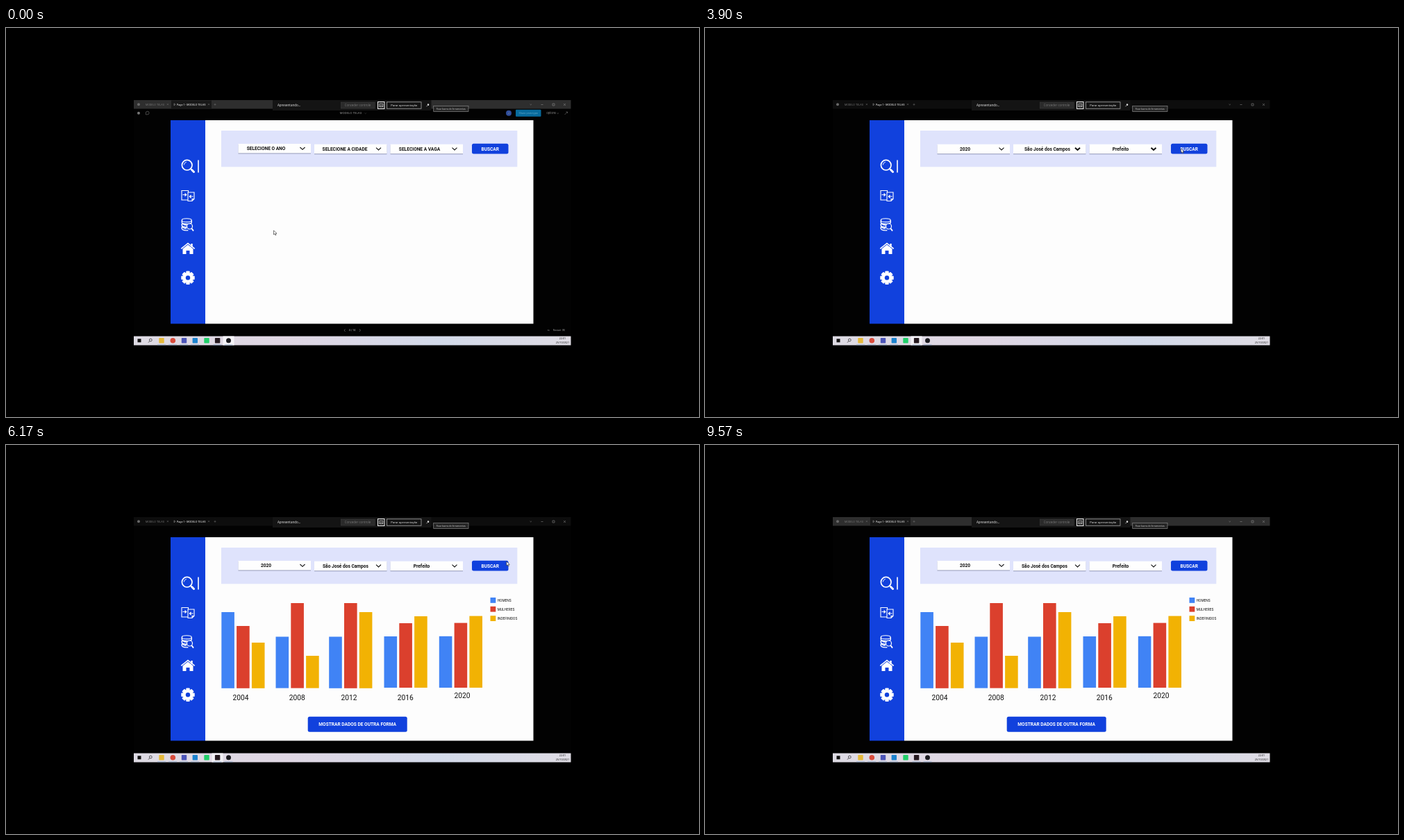
Recreate the animation shown at these times as an HTML page. Size 998x561 px, loop 9.61 s.

```html
<!DOCTYPE html>
<html lang="pt">
<head>
<meta charset="utf-8">
<style>
html, body { margin: 0; width: 100%; height: 100%; overflow: hidden; background: #000; }
svg { display: block; width: 998px; height: 561px; }
</style>
</head>
<body>
<svg id="stage" viewBox="0 0 998 561"></svg>
<script>
const LOOP = 9610;
const FOCUS_IN = 520, FOCUS_OUT = 8900;
const BLUE = '#1141dd', SERIES = ['#4083f5', '#db402d', '#f2b203'];
const UI = "'Open Sans', sans-serif", APP = 'Roboto, sans-serif', TABS = 'Inter, sans-serif';
const PROJECT = 'MODELO TELAS';

const rect = (x, y, w, h, fill, extra = '') =>
  `<rect x="${x}" y="${y}" width="${w}" height="${h}" fill="${fill}" ${extra}/>`;
const circle = (x, y, r, fill, extra = '') => `<circle cx="${x}" cy="${y}" r="${r}" fill="${fill}" ${extra}/>`;
const line = (d, color, width = 1, extra = '') =>
  `<path d="${d}" fill="none" stroke="${color}" stroke-width="${width}" ${extra}/>`;
const group = (id, body) => `<g id="${id}">${body}</g>`;

// y is the middle of the capital letters
const text = (x, y, size, str, { color = '#111', font = APP, weight = 400, anchor = 'middle' } = {}) =>
  `<text x="${x}" y="${y + size * .355}" font-size="${size}" fill="${color}" font-family="${font}"
    font-weight="${weight}" text-anchor="${anchor}">${str}</text>`;
const label = (x, y, str, color = '#111') => text(x, y, 6.6, str, { color, weight: 700 });

function button(x, y, w, h, str) {
  return rect(x, y, w, h, BLUE, 'rx="2.5"') + label(x + w / 2, y + h / 2, str, '#fff');
}

function select(x, y, str, { shift = 0, bold = false, chevronY = 0 } = {}) {
  return rect(x, y + .8, 104.5, 13.8, '#8d93ac', 'opacity=".65"') +
    rect(x, y, 104.5, 13.3, '#fefefe') +
    label(x + 45 + shift, y + 6.6, str) +
    line(`M${x + 89} ${y + 5 + chevronY}l3.5 3.3 3.5-3.3`, '#111', bold ? 2 : 1.1);
}

function windowFrame() {
  const dim = { color: '#777', font: TABS, anchor: 'start' };
  return rect(184, 104, 629.5, 353.5, '#020202') +
    group('titleBar', rect(184, 104, 629.5, 12.5, '#2e2e2e') + rect(238, 104.5, 58, 12, '#191919')) +
    group('titleBarDark', rect(184, 104, 629.5, 12.5, '#0d0d0d')) +
    circle(191, 110.3, 2, '#686868') +
    text(201, 110.3, 3.5, PROJECT, dim) +
    text(246, 110.3, 3.5, 'Page 1 - ' + PROJECT, { ...dim, color: '#ddd', weight: 500 }) +
    line('M242 108.8l2 1.5-2 1.5z', '#aaa', .5) +
    line('M231.9 109.2l2 2m0-2l-2 2M291 109.2l2 2m0-2l-2 2M299.5 110.3h3m-1.5-1.5v3', '#777', .5) +
    line('M754.5 109.8l1.2 1.1 1.2-1.1M770.5 110.5h3M787 109h3v3h-3zM803 109l3 3m0-3l-3 3', '#999', .5);
}

function meetingBar() {
  const ui = { font: UI, color: '#eee' };
  return rect(384, 104, 228.5, 15, '#141414') +
    text(391, 111.5, 4.5, 'Apresentando...', { ...ui, anchor: 'start' }) +
    rect(482.5, 107, 48.5, 9, '#2b2b2b', 'stroke="#424242" stroke-width=".5"') +
    text(506.5, 111.5, 4.4, 'Conceder controle', { ...ui, color: '#777' }) +
    rect(535.5, 106.5, 9.5, 10, '#222', 'stroke="#eee"') +
    line('M537.8 109.2h5v4.5h-5zM538.5 113l1.7-2 2.2 2', '#ddd', .7) +
    rect(548.5, 106.8, 49.5, 9.4, '#141414', 'stroke="#bbb" stroke-width=".7"') +
    text(573.3, 111.5, 4.2, 'Parar apresentação', ui) +
    line('M605.5 113.2l1.5-1.5M607 110l2 2', '#ddd', .8) + circle(608, 110.5, 1.2, '#ddd') +
    rect(615.7, 112.5, 50.3, 8, '#262626', 'stroke="#888" stroke-width=".7"') +
    text(640.8, 116.6, 3.4, 'Fixar barra de ferramentas', { ...ui, color: '#ccc' });
}

function viewerControls() {
  const dim = { color: '#999', font: TABS };
  return circle(191, 122.7, 2, '#777') +
    line('M201.3 124.8v-2a2.4 2.3 0 1 1 2.4 2z', '#777', .6) +
    text(496.5, 123, 4.1, PROJECT, dim) +
    line('M516.5 122.5l1.2 1.1 1.2-1.1', '#555', .5) +
    circle(724, 122.8, 4, '#304f9c') + text(724, 122.8, 3.5, 'J', dim) +
    rect(734, 117.8, 36.5, 10, '#086b9d', 'rx="1"') +
    text(752.3, 122.8, 3.6, 'Share prototype', { ...dim, color: '#62a6c5' }) +
    text(785, 122.8, 3.7, 'Options', dim) +
    line('M793.5 122.5l1.2 1.1 1.2-1.1M804.5 125l4-4m-2 0h2v2', '#888', .5) +
    text(498.5, 436, 3.8, '4 / 14', { ...dim, color: '#bbb' }) +
    line('M488.5 434.2l-1.5 1.8 1.5 1.8M509 434.2l1.5 1.8-1.5 1.8M783 436h-3l1-1', '#888', .6) +
    text(796.5, 436, 3.5, 'Restart (R)', dim);
}

function taskbar() {
  const tile = (x, fill) => rect(x - 3.7, 447, 7.4, 7.4, fill, 'rx=".7"');
  const clock = { font: UI };
  return rect(184, 444.5, 629.5, 13, 'url(#barTint)') +
    group('recorderActive', rect(312.5, 444.5, 16, 13, '#f6f4f8')) +
    group('viewerActive', rect(296.5, 444.5, 16, 13, '#f3f1f6')) +
    rect(189.5, 448.3, 5, 5, '#111') +
    circle(208.3, 450, 1.9, 'none', 'stroke="#222" stroke-width=".7"') + line('M207 451.6l-2 2', '#222', .8) +
    tile(224, '#e5b93a') + circle(240.3, 450.8, 3.8, '#d94c3c') + tile(256.5, '#4c55b8') +
    tile(272.3, '#1c83cf') + tile(289, '#20cf69') + tile(304.6, '#25191f') + circle(320.5, 450.8, 3.5, '#1b1b20') +
    line('M218 457h12M234 457h12M250 457h12M266 457h12M298.500 457h12M314.500 457h12', '#6c8eb5', .7) +
    text(801.5, 448, 3.7, '22:01', clock) + text(801.5, 453.8, 3.7, '25/10/2021', clock);
}

function sidebar() {
  const white = '#fff';
  const teeth = Array.from({ length: 8 }, (_, i) =>
    rect(259.3, 350.6, 5.4, 6, white, `rx="1" transform="rotate(${i * 45} 262 360.300)"`)).join('');
  return rect(237, 133, 50, 293.5, BLUE) +
    circle(260.7, 197.7, 7.3, 'none', 'stroke="#fff" stroke-width="1.7"') +
    line('M256.300 197.500a4.500 4.500 0 0 1 3.500-4.200', white, .9) +
    line('M266 203l1.500 1.500', white, 1.5) +
    line('M267.500 204.500l3 3', white, 3, 'stroke-linecap="round"') +
    line('M277 190.500v18', white, 1.6) +
    line('M262 248h-9v-13.500h9.500v3M262 237h9v9.500l-3 3h-6zM268 249.500v-3h3', white, 1.1) +
    line('M254.500 240.500h5m-2-2l2.200 2-2.200 2M269.500 243h-5m2-2l-2.200 2 2.200 2', white, 1.2) +
    `<ellipse cx="260.300" cy="277.300" rx="7" ry="2.600" fill="none" stroke="#fff" stroke-width="1.1"/>` +
    line('M253.300 277.500v3c1 3 13 3 14 0v-3M253.300 282v3c1 2 4 2.300 7 2.200M253.300 286.500v3c1 2 5 2.700 9 2.200', white, 1.4) +
    line('M254 282.200q3 2 6 2M254 287q3 2 6 2', white, 1.5) +
    circle(264.500, 286, 4, BLUE, 'stroke="#fff" stroke-width="1.2"') +
    line('M267.300 289l2.700 3.600', white, 1.8) +
    `<path d="M254.500 318.500l7.500-6 7.500 6v7.500h-5v-5h-5v5h-5z" fill="#fff"/>` +
    rect(266.300, 311, 2.400, 5, white) +
    line('M252.300 318.300l9.700-7.800 9.700 7.800', white, 1.6) +
    teeth + circle(262, 360.300, 7.200, white) + circle(262, 360.300, 3.200, BLUE);
}

function cityMenu() {
  const cities = ['São José dos Campos', 'Jacareí', 'Caçapava', 'Cruzeiro'];
  return rect(444, 181, 104.5, 64, '#fdfdfd', 'stroke="#d8d9e2" stroke-width=".6"') +
    rect(444, 181, 104.5, 16, BLUE) +
    line('M444 212.600h104.500M444 228.700h104.500', '#555', .8) +
    cities.map((city, i) => label(i == 3 ? 498 : 496.3, 189 + i * 15.9, city, i ? '#111' : '#fff')).join('');
}

function chart() {
  // first bar x, label centre, baseline, tops of the three bars
  const years = [
    [310.3, 338, 350.8, 241, 261, 285],
    [388.5, 419.3, 350.6, 276.5, 228, 304],
    [465.2, 494, 350.8, 276.5, 228, 241],
    [544.5, 575.3, 350, 276, 257, 247],
    [623.8, 657, 350, 275.8, 256.6, 246.6]
  ];
  const bars = years.map(([x, mid, base, ...tops], i) =>
    tops.map((top, k) => rect(x + k * 21.8, top, 18.6, base - top, SERIES[k])).join('') +
    text(mid, i == 4 ? 361.600 : 364, 10.2, 2004 + i * 4)).join('');
  const legend = ['HOMENS', 'MULHERES', 'INDEFINIDOS'].map((name, i) => {
    const y = [224, 236.8, 250.2][i];
    return rect(697.5, y - 4, 7.800, 7.800, SERIES[i]) + text(707.7, y, 4.800, name, { anchor: 'start' });
  }).join('');
  return bars + legend + button(434.7, 391.8, 143, 22, 'MOSTRAR DADOS DE OUTRA FORMA');
}

const SJC = 'São José dos Campos';
const yearField = (str, x = 334.5, y = 167) => select(x, y, str, { shift: -5 });
const cityField = (str = 'SELECIONE A CIDADE', opts) => select(444, 167.7, str, { shift: -1, ...opts });
const jobField = (str = 'SELECIONE A VAGA', opts) => select(553.5, 167.7, str, { shift: -3, ...opts });

const scenes = [
  [0, yearField('SELECIONE O ANO') + cityField() + jobField()],
  [1300, yearField('2020', 332, 167.7) + cityField() + jobField()],
  [1830, yearField('2020', 332, 167.7) +
    select(444, 167, 'SELECIONE A CIDADE', { shift: -1, chevronY: -1 }) + jobField() + cityMenu()],
  [2400, yearField('2020', 334.5, 167.7) + cityField(SJC, { shift: 4, bold: true }) + jobField()],
  [3250, yearField('2020', 334.5, 167.7) + cityField(SJC, { shift: 4, bold: true }) +
    jobField('Prefeito', { shift: 0, bold: true })],
  [4100, yearField('2020') + cityField(SJC, { shift: 0 }) + jobField('Prefeito', { shift: 0 }) + chart()]
];

const cursorPath = [
  [0, 385.5, 292], [400, 385.5, 292], [900, 388, 172], [1350, 388, 186], [1750, 495, 172],
  [2000, 495, 188.5], [2350, 495, 188.5], [2750, 604, 173], [3250, 604, 187], [3700, 685.5, 174],
  [4200, 685.5, 174], [4750, 548.7, 403], [5200, 548.7, 403], [5900, 720.8, 168],
  [8300, 720.3, 168], [8900, 319, 449]
];

function cursorAt(t) {
  const next = cursorPath.findIndex(point => point[0] > t);
  if (next < 0) return cursorPath.at(-1).slice(1);
  const [t0, x0, y0] = cursorPath[next - 1], [t1, x1, y1] = cursorPath[next];
  const p = (t - t0) / (t1 - t0), ease = p * p * (3 - 2 * p);
  return [x0 + (x1 - x0) * ease, y0 + (y1 - y0) * ease];
}

const find = id => document.getElementById(id);
find('stage').innerHTML =
  `<defs><linearGradient id="barTint"><stop stop-color="#dedbe4"/><stop offset=".35" stop-color="#e0d7e4"/>
    <stop offset=".7" stop-color="#d3daea"/><stop offset="1" stop-color="#dfdce4"/></linearGradient></defs>` +
  windowFrame() + meetingBar() + group('controls', viewerControls()) +
  rect(287, 133, 472.5, 293.5, '#fdfdfd') + sidebar() +
  rect(310, 148, 426.3, 52.3, '#dfe3fc') + button(671, 166.8, 52.5, 14.8, 'BUSCAR') +
  scenes.map(([, body], i) => group('scene' + i, body)).join('') + taskbar() +
  group('cursor', '<path d="M0 0v6l1.400-1.300 1 2.200 1.100-.5-1-2.100h2z" fill="#fff" stroke="#222" stroke-width=".6"/>');

const show = (id, on) => find(id).style.display = on ? '' : 'none';

function draw(now) {
  const t = now % LOOP;
  const focused = t >= FOCUS_IN && t < FOCUS_OUT;
  show('titleBar', !focused);
  show('titleBarDark', focused);
  show('controls', t < FOCUS_IN);
  show('recorderActive', t < FOCUS_IN);
  show('viewerActive', focused);
  const current = scenes.findLastIndex(([start]) => t >= start);
  scenes.forEach((_, i) => show('scene' + i, i === current));
  show('cursor', t < FOCUS_OUT);
  find('cursor').setAttribute('transform', `translate(${cursorAt(t)})`);
}

const began = performance.now();
function tick() {
  draw(performance.now() - began);
  requestAnimationFrame(tick);
}
tick();
</script>
</body>
</html>
```
